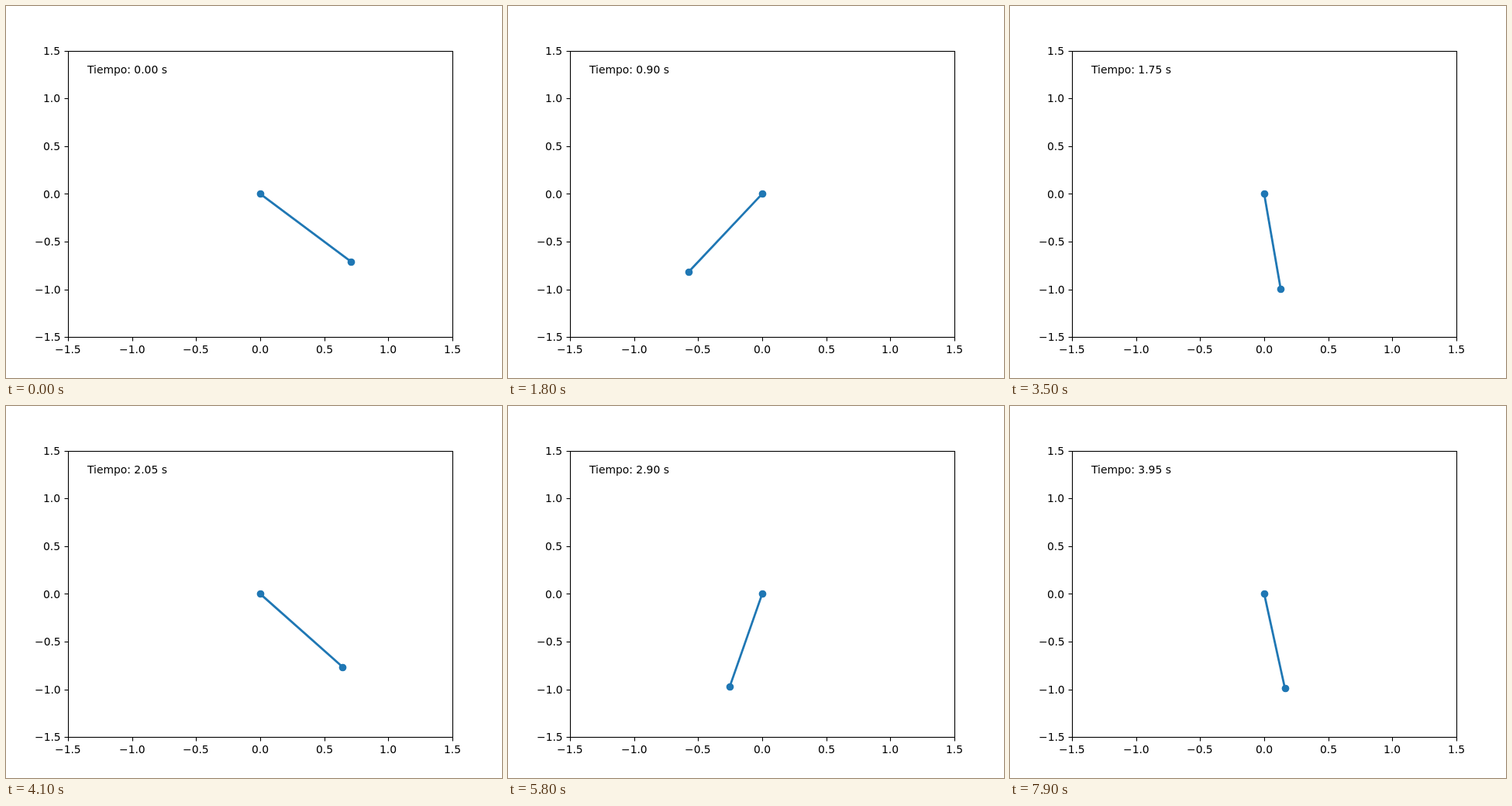
These frames come from a looping animation (640x480 px, 8 s). An HTML page with a canvas:

```html
<!DOCTYPE html>
<html lang="es">
<head>
<meta charset="utf-8">
<title>Péndulo</title>
<style>
html, body { margin: 0; width: 640px; height: 480px; overflow: hidden; background: #fff; }
canvas { display: block; }
</style>
</head>
<body>
<canvas id="stage" width="640" height="480"></canvas>
<script>
const ctx = document.getElementById('stage').getContext('2d');
const STEP_MS = 100, STEPS = 80, DT = 0.05;
const LEFT = 80, RIGHT = 576, TOP = 57.6, BOTTOM = 427.2;
const BLUE = '#1f77b4';

const px = x => LEFT + (x + 1.5) / 3 * (RIGHT - LEFT);
const py = y => BOTTOM - (y + 1.5) / 3 * (BOTTOM - TOP);
const snap = v => Math.round(v) + 0.5;

// Swing angle: slowly growing amplitude with a slightly rising frequency.
function angle(t) {
  const amp = 0.7866 - 0.0223 * t + 0.02 * t * t;
  const s = t - 0.5805;
  return -amp * Math.sin(2.8105 * s + 0.0102 * s * s);
}

function segment(x1, y1, x2, y2) {
  ctx.beginPath();
  ctx.moveTo(x1, y1);
  ctx.lineTo(x2, y2);
  ctx.stroke();
}

function label(text, x, y, align) {
  const w = ctx.measureText(text).width;
  ctx.fillText(text, Math.round(x - w * align), Math.round(y));
}

function dot(x, y) {
  ctx.beginPath();
  ctx.arc(snap(x), snap(y), 4.86, 0, 2 * Math.PI);
  ctx.fill();
}

function drawAxes() {
  ctx.strokeStyle = ctx.fillStyle = '#000';
  ctx.lineWidth = 1.11;
  const l = snap(LEFT), b = snap(BOTTOM);
  for (let v = -1.5; v <= 1.5; v += 0.5) {
    const text = v.toFixed(1).replace('-', '\u2212');
    const x = px(v), y = py(v);
    segment(snap(x), b, snap(x), b + 5);
    segment(l, snap(y), l - 5, snap(y));
    label(text, x, 448, 0.5);
    label(text, 70.3, y + 5.1, 1);
  }
  ctx.strokeRect(l, snap(TOP), RIGHT - LEFT, b - snap(TOP));
}

function drawPendulum(t) {
  const a = angle(t);
  const x = px(Math.sin(a)), y = py(-Math.cos(a));
  ctx.strokeStyle = ctx.fillStyle = BLUE;
  ctx.lineWidth = 2.78;
  segment(px(0), py(0), x, y);
  dot(px(0), py(0));
  dot(x, y);
}

function draw(t) {
  ctx.fillStyle = '#fff';
  ctx.fillRect(0, 0, 640, 480);
  ctx.font = '13.89px "DejaVu Sans", sans-serif';
  drawPendulum(t);
  drawAxes();
  label('Tiempo: ' + t.toFixed(2) + ' s', 104.8, 87, 0);
}

let start = null;
function tick(now) {
  if (start === null) start = now;
  draw(Math.floor((now - start) / STEP_MS) % STEPS * DT);
  requestAnimationFrame(tick);
}
draw(0);
requestAnimationFrame(tick);
</script>
</body>
</html>
```
